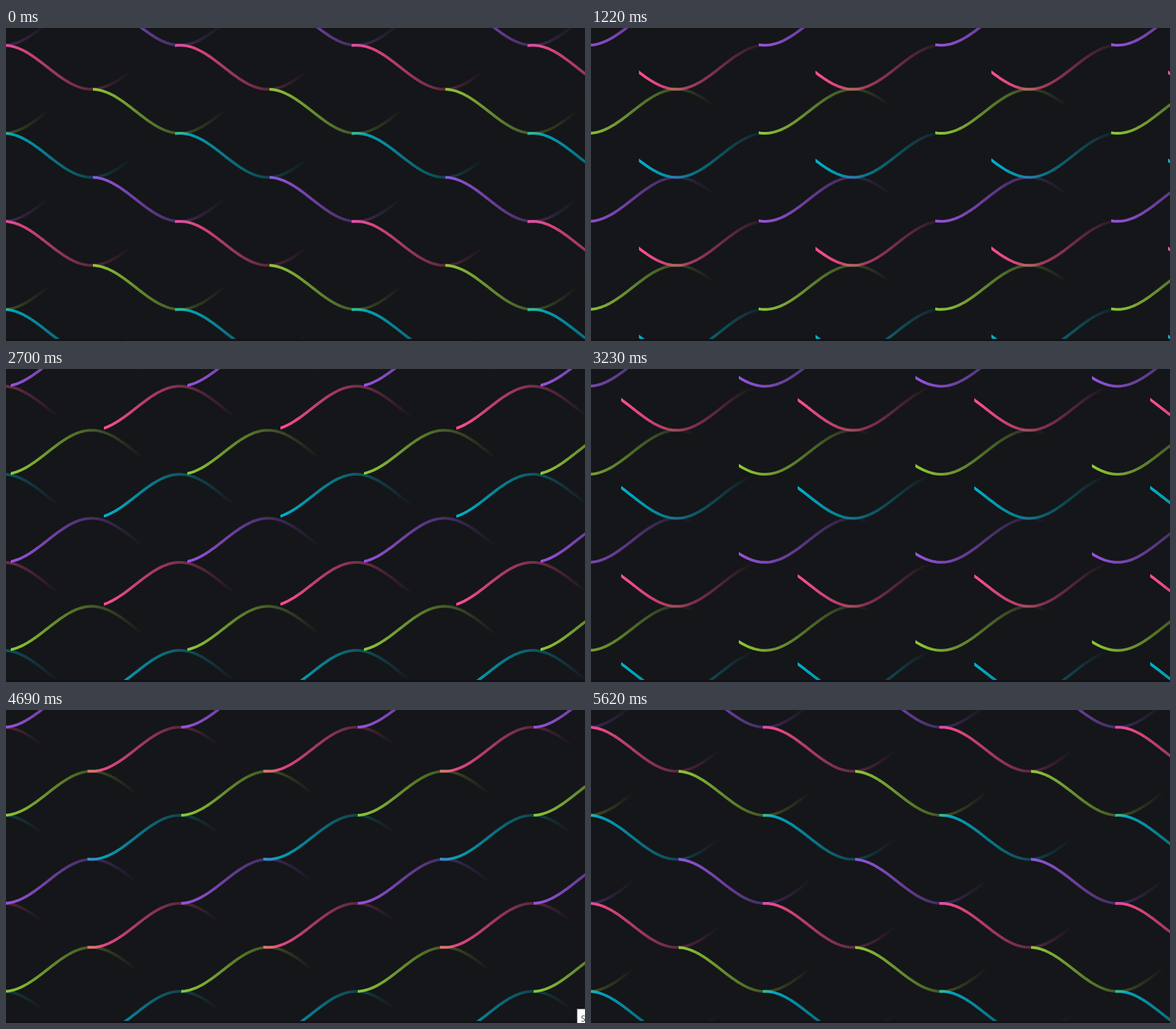
Write an HTML page with a canvas that moves like this. It is 846x458 px and loops after 5690 ms.

```html
<!DOCTYPE html>
<html lang="en">
<head>
<meta charset="utf-8">
<title>Waves</title>
<style>
  html, body { margin: 0; width: 100%; height: 100%; overflow: hidden; background: #151619; }
  canvas { display: block; }
</style>
</head>
<body>
<canvas id="stage" width="846" height="458"></canvas>
<script>
const W = 846, H = 458;
const LOOP = 5690, STEP = LOOP / 74;   // the picture is held for one step
const BEAT = 938.5;                    // time in which each trail moves half a wave
const WAVE = 257.7, AMP = 32.2, ROW = WAVE / 4;
const CREST_X = 254, FIRST_ROW_Y = 57.4;
const TRAIL = WAVE * 0.75;
const COLORS = [[255, 79, 145], [143, 200, 56], [0, 177, 203], [150, 84, 222]];
const ctx = document.getElementById('stage').getContext('2d');

const mod = (a, n) => ((a % n) + n) % n;

// Left ends of the even and odd rows' trails; they take turns hurrying.
function heads(t) {
  const sum = 374 - WAVE * t / BEAT;
  const gap = 107.2 - 29.5 * Math.sin(2 * Math.PI * t / BEAT - 0.45);
  return [(sum + gap) / 2, (sum - gap) / 2];
}

function drawTrail(row, x0) {
  const rgb = COLORS[mod(row, 4)].join();
  const fade = ctx.createLinearGradient(x0, 0, x0 + TRAIL, 0);
  fade.addColorStop(0, `rgba(${rgb},1)`);
  fade.addColorStop(1, `rgba(${rgb},0)`);
  const center = FIRST_ROW_Y + row * ROW;
  const sign = row % 2 ? 1 : -1;
  ctx.save();
  ctx.beginPath();
  ctx.rect(x0, 0, TRAIL, H);
  ctx.clip();
  ctx.beginPath();
  for (let x = x0 - 6; x < x0 + TRAIL + 6; x += 3) {
    ctx.lineTo(x, center + sign * AMP * Math.cos(2 * Math.PI * (x - CREST_X) / WAVE));
  }
  ctx.strokeStyle = fade;
  ctx.lineWidth = 4;
  ctx.stroke();
  ctx.restore();
}

function drawTooltip() {
  ctx.fillStyle = '#fff';
  ctx.fillRect(834, 437, 12, 21);
  ctx.strokeStyle = '#767676';
  ctx.lineWidth = 1;
  ctx.strokeRect(834.5, 437.5, 20, 30);
  ctx.fillStyle = '#444';
  ctx.font = '12px "Open Sans", sans-serif';
  ctx.fillText('S', 840, 456);
}

function draw(time) {
  const t = Math.floor((time % LOOP + 8) / STEP) % 74 * STEP;
  ctx.fillStyle = '#151619';
  ctx.fillRect(0, 0, W, H);
  heads(t).forEach((head, parity) => {
    const first = mod(head, WAVE) - WAVE;
    for (let row = parity - 2; row < 8; row += 2) {
      for (let x = first; x < W; x += WAVE) drawTrail(row, Math.round(x));
    }
  });
  ctx.fillStyle = '#121115';
  ctx.fillRect(0, 455, W, 3);
  if (t > 4600 && t < 5000) drawTooltip();
}

const start = performance.now();
function tick() {
  draw(performance.now() - start);
  requestAnimationFrame(tick);
}
tick();
</script>
</body>
</html>
```
